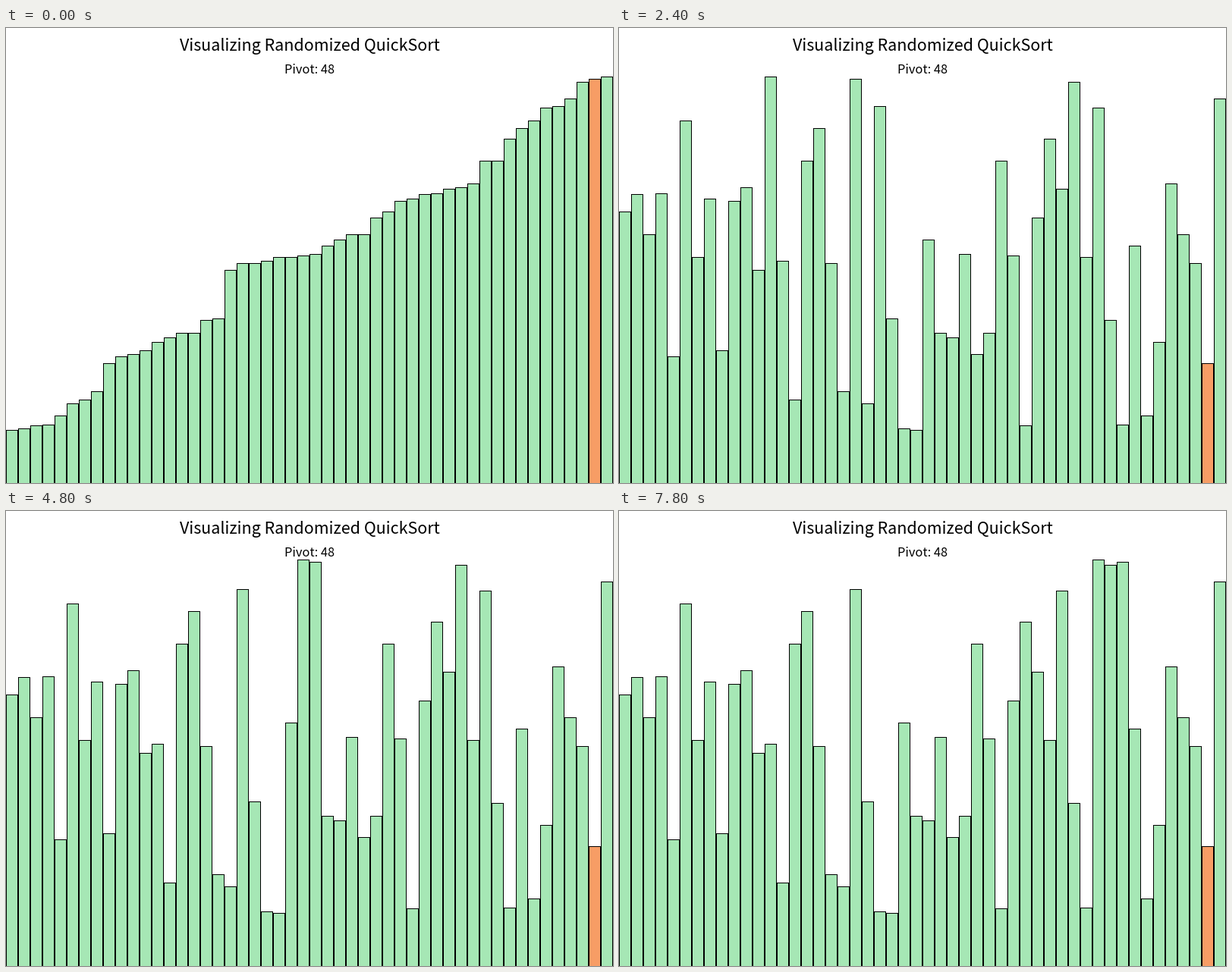
Recreate the animation shown at these times as a matplotlib script. Size 800 px wide and 600 px high, loop 8000 ms.

```python
import matplotlib.pyplot as plt
from matplotlib.animation import FuncAnimation

W, H, DPI = 800, 600, 100
BAR = 16
FRAMES, STEP_MS = 40, 200
GREEN, ORANGE = "#a6e7b5", "#f79d65"
MARKED = 48

# Distance from the top of the stage to the top of each bar, unsorted.
TOPS = [242, 219, 272, 218, 433, 64, 122, 302, 225, 425,
        228, 210, 319, 307, 490, 175, 132, 310, 479, 67,
        495, 103, 383, 528, 530, 279, 402, 408, 298, 430,
        402, 175, 300, 524, 250, 146, 212, 71, 302, 105,
        385, 523, 287, 511, 414, 205, 272, 310, 442, 93]
VALUES = [H - top for top in TOPS]


def partition_steps(values):
    """Array after each swap of a partition around the last value."""
    arr = list(values)
    pivot, slot = arr[-1], 0
    for j in range(len(arr) - 1):
        if arr[j] < pivot:
            arr[slot], arr[j] = arr[j], arr[slot]
            slot += 1
            yield list(arr)


states = ([sorted(VALUES)] + list(partition_steps(VALUES)))[:FRAMES]

fig = plt.figure(figsize=(W / DPI, H / DPI), dpi=DPI, facecolor="white")
ax = fig.add_axes([0, 0, 1, 1])
ax.set_xlim(0, W)
ax.set_ylim(0, H)
ax.axis("off")

left = [BAR * i for i in range(len(VALUES))]
fills = [ORANGE if i == MARKED else GREEN for i in range(len(VALUES))]
style = dict(align="edge", linewidth=0, antialiased=False)
frames_bars = ax.bar(left, states[0], BAR, color="black", **style)
fill_bars = ax.bar([x + 1 for x in left], states[0], BAR - 2,
                   color=fills, **style)
ax.set_xlim(0, W)
ax.set_ylim(0, H)


def label(text, baseline, px):
    ax.text(W / 2, H - baseline, text, ha="center", va="baseline",
            color="black", family="Noto Sans CJK JP", size=px * 72 / DPI)


label("Visualizing Randomized QuickSort", 30, 21.5)
label(f"Pivot: {MARKED}", 60, 16.4)


def draw(k):
    for outer, inner, value in zip(frames_bars, fill_bars, states[k]):
        outer.set_height(value)
        inner.set_height(value - 1)
    return [*frames_bars, *fill_bars]


anim = FuncAnimation(fig, draw, frames=FRAMES, interval=STEP_MS,
                     init_func=lambda: draw(0), repeat=True, repeat_delay=0)
plt.show()
```
